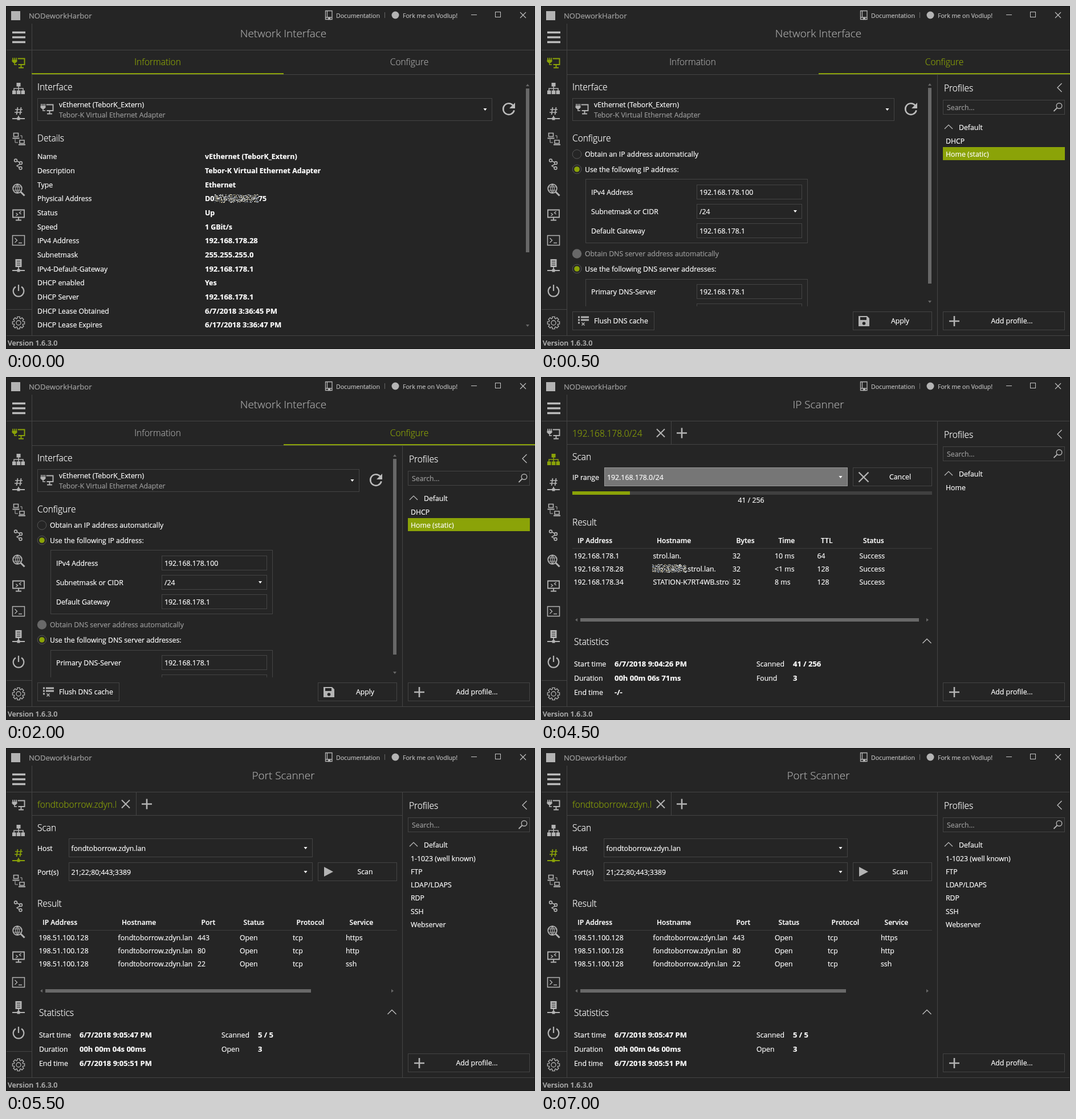
Animation of 928x603 px, one loop 8000 ms. Source, as an HTML page:

```html
<!DOCTYPE html>
<html lang="en">
<head>
<meta charset="utf-8">
<title>Network tools</title>
<style>
html, body { margin: 0; width: 100%; height: 100%; overflow: hidden; background: #252525; }
svg { display: block; width: 928px; height: 603px; }
text {
  font: 12.3px "Open Sans", "Noto Sans", sans-serif; white-space: pre;
  color: #fff; fill: currentColor; stroke: currentColor; stroke-width: .2px;
}
.b { font-weight: 700; font-size: 12.4px; }
.n { font-weight: 700; font-size: 13px; }
.s { font-weight: 600; font-size: 12.1px; }
.h { font-weight: 300; font-size: 15.5px; stroke-width: .25px; }
.t { font-weight: 300; font-size: 18.9px; color: #adadad; }
.tab { font-weight: 300; font-size: 15.5px; color: #a8a8a8; }
.on { color: #8ba308; }
.dim { color: #9b9b9b; }
.app { font-size: 13.1px; color: #a3a3a3; }
.cmd { font-size: 10.6px; color: #c0c0c0; }
.ver { font-weight: 600; font-size: 12.5px; color: #b4b4b4; }
.mid { text-anchor: middle; }
</style>
</head>
<body>
<svg id="stage" viewBox="0 0 928 603"></svg>
<script>
const LIME = '#8ba308', LINE = '#444', ICON = '#b4b4b4', BAR = '#686868', BG = '#252525';
const LOOP = 8000;
const HOST = 'fondtoborrow.zdyn.lan';
const ADAPTER = 'Tebor-K Virtual Ethernet Adapter', LINK = 'vEthernet (TeborK_Extern)';

// Drawing helpers
const text = (x, y, s, cls = '') =>
  `<text x="${x}" y="${y}" class="${cls}">${s.replace(/</g, '&lt;')}</text>`;
const fill = (x, y, w, h, c) => `<rect x="${x}" y="${y}" width="${w}" height="${h}" fill="${c}"/>`;
const box = (x1, y1, x2, y2, bg = 'none', c = LINE) =>
  `<rect x="${x1 + .5}" y="${y1 + .5}" width="${x2 - x1 - 1}" height="${y2 - y1 - 1}" fill="${bg}" stroke="${c}"/>`;
const hline = (x1, x2, y, c = LINE) => fill(x1, y, x2 - x1, 1, c);
const vline = (x, y1, y2, c = LINE) => fill(x, y1, 1, y2 - y1, c);
const stroke = (d, c = ICON, w = 2) => `<path d="${d}" fill="none" stroke="${c}" stroke-width="${w}"/>`;
const solid = (d, c = ICON) => `<path d="${d}" fill="${c}"/>`;
const ring = (x, y, r, c = ICON, w = 2) =>
  `<circle cx="${x}" cy="${y}" r="${r}" fill="none" stroke="${c}" stroke-width="${w}"/>`;
const dot = (x, y, r, c = ICON) => `<circle cx="${x}" cy="${y}" r="${r}" fill="${c}"/>`;
const at = (x, y, s) => `<g transform="translate(${x} ${y})">${s}</g>`;
const clip = (x, y, w, h, s) =>
  `<svg x="${x}" y="${y}" width="${w}" height="${h}" viewBox="${x} ${y} ${w} ${h}">${s}</svg>`;
const arrow = (x, y, turn = 0, c = '#fff') =>
  `<path d="M-3-2h6l-3 4z" fill="${c}" transform="translate(${x} ${y}) rotate(${turn})"/>`;
const cross = (x, y, r, w) => stroke(`M${x - r} ${y - r}l${2 * r} ${2 * r}m0 ${-2 * r}l${-2 * r} ${2 * r}`, ICON, w);
const plus = (x, y, r) => stroke(`M${x - r} ${y}h${2 * r}M${x} ${y - r}v${2 * r}`, ICON, 2.6);

function gear() {
  let d = '';
  for (let i = 0; i < 8; i++) {
    [[-.3, 8], [-.2, 10.8], [.2, 10.8], [.3, 8]].forEach(([o, r]) => {
      const a = i * Math.PI / 4 + o;
      d += `${d ? 'L' : 'M'}${(r * Math.cos(a)).toFixed(2)} ${(r * Math.sin(a)).toFixed(2)}`;
    });
  }
  return stroke(d + 'Z', ICON, 1.3) + ring(0, 0, 4, ICON, 1.3);
}

const icons = {
  nic: c => stroke('M-10-9v5M-7-9v5M-4-9v5M-7-1v4h4', c, 1.6) + solid('M-11.5-5.5h9v3l-2.5 2.5h-4l-2.5-2.5z', c) +
    stroke('M-1.5-7.5h12v10.5h-11M4.5 3v5M0 8.5h9', c, 1.9),
  tree: c => solid('M-3.5-10h7v6.5h-7zM-11 3.5h6.5v6.5h-6.5zM-3.2 3.5h6.5v6.5h-6.5zM4.5 3.5h6.5v6.5h-6.5z', c) +
    stroke('M0-4v8M-8 4v-4h16v4', c, 1.5),
  port: c => stroke('M-1.5-11l-2 13M4.5-11l-2 13M-6-7h13M-7-2h13', c, 1.7) +
    stroke('M0 4v4M-11 9h22', c, 1.8) + solid('M-2.5 6.5h5v5h-5z', c),
  hosts: c => stroke('M-8.5-10.5h8v6h-8zM2 2h8v5.5h-8z', c, 1.6) +
    stroke('M-10.5-1.5h12M0 9.7h12', c, 2) + stroke('M-6 0v6h5M3-6h3v5', c, 1),
  route: c => [[-5, -6.5], [4, -2], [3.5, 7]].map(([x, y]) => ring(x, y, 2.4, c, 1.6)).join('') +
    stroke('M-3-5.5L2-3M2.5 0L-3 3L1.5 6', c, 1.5),
  globe: c => ring(-2, -2, 7.8, c, 1.8) +
    stroke('M-9-5H5M-9 1H5M-2-10V6M-2-10q-7 8 0 16q7-8 0-16', c, 1.1) + stroke('M3.5 3.5l7 7', c, 3),
  remote: c => stroke('M-10-8.5h20v13h-20zM0 4.5v4M-5 9.5h10', c, 1.8) +
    stroke('M-4.5-3l3 2.5l-3 2.5M4.500-6l-3 2.5l3 2.5', c, 1.4),
  shell: c => stroke('M-10.5-8.5h21v17h-21z', c, 1.5) + stroke('M-6.5-4l4 4l-4 4M0 4.5h6', c, 1.4),
  server: c => solid('M-5.5-11h11v14h-11z', c) + stroke('M-3-7.5h6M-3-4h6M-3-.5h6', BG, 1) +
    stroke('M0 3v5M-11 9h22', c, 1.8) + solid('M-2.5 6.5h5v5h-5z', c),
  power: c => stroke('M-5-7.5A9.300 9.300 0 1 0 5-7.5M0-11V0', c, 2.2),
};
const side = Object.keys(icons);
const sideY = i => 100 + Math.round(i * 44.55);

const refresh = x => at(x, 181,
  stroke('M7.2-6.6A9.8 9.8 0 1 0 9.5 2.4', '#bcbcbc', 2.6) + solid('M11-11v10h-10z', '#bcbcbc'));

// Speckled cover over hidden text
function scrub(x, y, w, h, seed) {
  const tones = ['#e9e9e9', '#8f8f8f', '#141414', '#c9bd91', '#7d8ba0'];
  const paths = tones.map(() => '');
  const rnd = () => (seed = seed * 16807 % 2147483647) / 2147483647;
  for (let j = 0; j < h; j++) for (let i = 0; i < w; i++) {
    const edge = Math.abs(j + .5 - h / 2) / (h / 2) + .12 * Math.sin(i * .4);
    if (rnd() > (edge > .85 ? .2 : .68)) continue;
    paths[Math.floor(rnd() * tones.length)] += `M${x + i} ${y + j}h1v1h-1z`;
  }
  return paths.map((d, i) => solid(d, tones[i])).join('');
}

function shell() {
  let s = fill(0, 0, 928, 603, BG);
  s += hline(0, 928, 77) + hline(0, 928, 579) + hline(0, 45, 533) + vline(45, 31, 579);
  s += fill(9, 9, 16, 16, ICON) + text(40, 22, 'NODeworkHarbor', 'app');
  s += stroke('M560.5 8.5h11.5v15h-11.5zM563.5 8v12M560 20h12', ICON, 1.3) + solid('M565 20h4v5l-2-2l-2 2z');
  s += text(579, 20.5, 'Documentation', 'cmd') + vline(664, 11, 21, '#666');
  s += dot(683, 16, 6.5) + text(696, 20.5, 'Fork me on Vodlup!', 'cmd');
  s += hline(816, 826, 15, '#c4c4c4') + box(858, 10, 868, 20, 'none', '#c4c4c4');
  s += stroke('M902 11l10 10m0-10l-10 10', '#c4c4c4', 1.1);
  s += stroke('M11 46.5h23M11 55h23M11 63.5h23', '#bcbcbc', 3.6);
  side.forEach((k, i) => s += at(22, sideY(i), icons[k](ICON)));
  s += at(22, 557, gear());
  return s + text(3, 596.5, 'Version 1.6.3.0', 'ver') + box(0, 0, 928, 603, 'none', '#171717');
}

const active = i => fill(8, sideY(i) - 14, 29, 28, BG) + at(22, sideY(i), icons[side[i]](LIME));
const title = s => text(486.5, 54.5, s, 't mid');

function button(x1, y1, x2, y2, label, cx) {
  return box(x1, y1, x2, y2) + text(cx, (y1 + y2) / 2 + 4.8, label, 'mid');
}

function tabs(second) {
  return hline(45, 928, 120) + fill(second ? 487 : 45, 118, second ? 441 : 442, 2, LIME) +
    text(266, 104, 'Information', 'tab mid' + (second ? '' : ' on')) +
    text(707.5, 104, 'Configure', 'tab mid' + (second ? ' on' : ''));
}

function adapter(right, cx) {
  return text(55, 147.5, 'Interface', 'h') + box(55, 162, right, 202) + at(72, 181, icons.nic(ICON)) +
    text(93, 178, LINK) + text(93, 195.7, ADAPTER, 'dim') + arrow(right - 12.5, 182) + refresh(cx);
}

function vbar(x, y1, y2, end) {
  return fill(x - 3, y1, 6, y2 - y1, BAR) + arrow(x, y1 - 6, 180, BAR) + arrow(x, end, 0, BAR);
}

function profiles(dy, items, sel = -1) {
  let s = vline(695, 77 + dy, 579) + text(707, 107 + dy, 'Profiles', 'h');
  s += stroke(`M913.5 ${93 + dy}l-7.5 7.5l7.5 7.5`, '#c0c0c0', 1.3);
  s += box(705, 122 + dy, 919, 148 + dy) + text(712, 140 + dy, 'Search...', 'dim');
  s += ring(909, 132.5 + dy, 4.8, ICON, 1.4) + stroke(`M905.5 ${136 + dy}l-6 6`, ICON, 1.8);
  s += stroke(`M708 ${173 + dy}l7-7l7 7`, '#c0c0c0', 1.2) + text(733, 174.8 + dy, 'Default');
  items.forEach((t, i) => {
    if (i === sel) s += fill(705, 248, 214, 23, LIME);
    s += text(710, 198.8 + dy + i * 23.2, t);
  });
  return s + button(705, 537, 919, 570, 'Add profile...', 826) + plus(725, 554, 9);
}

function radio(y, label, state) {
  const off = state === 'off';
  return (off ? dot(63, y, 8.2, BAR) : ring(63, y, 7.8, '#565656', 1)) +
    (state === 'on' ? dot(63, y, 4.8, LIME) : '') + text(77, y + 4.8, label, off ? 'dim' : '');
}

const field = (y, label, value) =>
  text(88, y + 17.5, label) + box(273, y, 458, y + 26) + text(278, y + 17.5, value);

function scanTab(label) {
  return hline(45, 695, 118) + vline(228, 77, 118) +
    clip(55, 80, 139, 36, text(55, 104.5, label, 'tab on')) + cross(210, 98.5, 7, 2) + plus(247, 98.5, 9) +
    text(55, 145.5, 'Scan', 'h');
}

function table(y, cols, heads, rows) {
  let s = heads.map((t, i) => text(cols[i] + 6.5, y, t, 's')).join('') + hline(55, 686, y + 9, '#3d3d3d');
  rows.forEach((r, j) => r.forEach((t, i) => {
    s += clip(cols[i] - 3, y + 12 + j * 23.2, 137, 24, text(cols[i], y + 26.8 + j * 23.2, t));
  }));
  return s;
}

function stats(thumb, left, right) {
  let s = fill(69, 424, thumb - 69, 6, BAR) + arrow(62, 427, 90, BAR) + arrow(678, 427, -90, BAR);
  s += text(58, 471, 'Statistics', 'h') + stroke('M669.5 468l7.5-7.5l7.5 7.5', '#c0c0c0', 1.3);
  ['Start time', 'Duration', 'End time'].forEach((t, i) =>
    s += text(58, 509.4 + i * 25, t) + text(129, 509.4 + i * 25, left[i], 'n'));
  right.forEach(([k, v], i) => s += text(378, 509.4 + i * 25, k) + text(442, 509.4 + i * 25, v, 'n'));
  return s;
}

function infoScene() {
  let s = active(0) + title('Network Interface') + tabs(false) + adapter(853, 882) + text(55, 238.3, 'Details', 'h');
  [['Name', LINK], ['Description', ADAPTER], ['Type', 'Ethernet'], ['Physical Address', 'D0'], ['Status', 'Up'],
    ['Speed', '1 GBit/s'], ['IPv4 Address', '192.168.178.28'], ['Subnetmask', '255.255.255.0'],
    ['IPv4-Default-Gateway', '192.168.178.1'], ['DHCP enabled', 'Yes'], ['DHCP Server', '192.168.178.1'],
    ['DHCP Lease Obtained', '6/7/2018 3:36:45 PM'], ['DHCP Lease Expires', '6/17/2018 3:36:47 PM']
  ].forEach(([k, v], i) => {
    const y = 269.3 + i * 24.67;
    s += text(55, y, k) + text(349, y, v, /\.\d|:/.test(v) ? 'n' : 'b');
  });
  return s + scrub(366, 331, 77, 15, 77) + text(443, 343.3, '75', 'b') + vbar(915, 145, 433, 562);
}

function configScene() {
  let s = active(0) + title('Network Interface') + tabs(true) + adapter(620, 649) + text(55, 238.3, 'Configure', 'h');
  s += radio(260.5, 'Obtain an IP address automatically') + radio(287, 'Use the following IP address:', 'on');
  s += box(78, 304, 468, 417) + field(314, 'IPv4 Address', '192.168.178.100') +
    field(348, 'Subnetmask or CIDR', '/24') + arrow(446, 361) + field(382, 'Default Gateway', '192.168.178.1');
  s += radio(435.5, 'Obtain DNS server address automatically', 'off') +
    radio(462, 'Use the following DNS server addresses:', 'on');
  s += clip(50, 475, 430, 53, box(78, 480, 468, 560) + field(489, 'Primary DNS-Server', '192.168.178.1') +
    box(273, 523, 458, 549));
  s += vbar(682, 144, 488, 520);
  s += box(55, 537, 199, 570) + text(93, 558.2, 'Flush DNS cache');
  s += stroke('M65 547h3M65 552h3M65 557h3M70 547h14M70 552h14', ICON, 3) + cross(74, 559, 2.5, 1.5);
  s += button(547, 537, 686, 570, 'Apply', 630);
  s += solid('M557 545h15l4 4v14h-19z') + fill(560, 547, 11, 5, BG) + dot(566.5, 558, 2.8, BG);
  return s + profiles(43, ['DHCP', 'Home (static)'], 1);
}

function ipScene() {
  const range = '192.168.178.0/24';
  let s = active(1) + title('IP Scanner') + scanTab(range) + text(55, 180.9, 'IP range');
  s += box(111, 159, 538, 192, '#767676', '#989898') + text(116, 180.9, range) + arrow(525.5, 176);
  s += button(547, 159, 686, 192, 'Cancel', 630) + cross(566, 176, 8.5, 2.4);
  s += fill(55, 201, 631, 6, '#404040') + fill(55, 201, 101, 6, LIME) + text(368.5, 220.7, '41 / 256', 'mid');
  s += text(55, 260.5, 'Result', 'h');
  s += table(291.8, [57.5, 196.5, 336, 410, 484.5, 558.5],
    ['IP Address', 'Hostname', 'Bytes', 'Time', 'TTL', 'Status'],
    [['192.168.178.1', 'strol.lan.', '32', '10 ms', '64', 'Success'],
      ['192.168.178.28', '', '32', '<1 ms', '128', 'Success'],
      ['192.168.178.34', 'STATION-K7RT4WB.strol', '32', '8 ms', '128', 'Success']]);
  s += scrub(195, 329, 60, 15, 41) + text(254, 341.8, '.strol.lan.');
  s += stats(663, ['6/7/2018 9:04:26 PM', '00h 00m 06s 71ms', '-/-'], [['Scanned', '41 / 256'], ['Found', '3']]);
  return s + profiles(0, ['Home']);
}

function portScene() {
  const ip = '198.51.100.128';
  let s = active(2) + title('Port Scanner') + scanTab(HOST);
  [['Host', HOST], ['Port(s)', '21;22;80;443;3389']].forEach(([k, v], i) => {
    const y = 159 + i * 42;
    s += text(55, y + 21.9, k) + box(110, y, 538, y + 33) + text(114.5, y + 21.9, v) + arrow(525.5, y + 17);
  });
  s += button(547, 201, 686, 234, 'Scan', 630) + solid('M558 209l16 8.5l-16 8.5z');
  s += text(55, 278.8, 'Result', 'h');
  s += table(311, [57.5, 196.5, 336, 410, 503, 596],
    ['IP Address', 'Hostname', 'Port', 'Status', 'Protocol', 'Service'],
    [['443', 'https'], ['80', 'http'], ['22', 'ssh']].map(([p, v]) => [ip, HOST, p, 'Open', 'tcp', v]));
  s += stats(535, ['6/7/2018 9:05:47 PM', '00h 00m 04s 00ms', '6/7/2018 9:05:51 PM'],
    [['Scanned', '5 / 5'], ['Open', '3']]);
  return s + profiles(0, ['1-1023 (well known)', 'FTP', 'LDAP/LDAPS', 'RDP', 'SSH', 'Webserver']);
}

// Each scene is shown from its start until the next one cuts in
const scenes = [[0, infoScene], [500, configScene], [3000, ipScene], [5500, portScene]];
const stage = document.getElementById('stage');
stage.innerHTML = shell() + scenes.map(([, draw]) => `<g class="scene">${draw()}</g>`).join('');
const layers = stage.querySelectorAll('.scene');

function tick() {
  const t = performance.now() % LOOP;
  const now = scenes.filter(([start]) => start <= t).length - 1;
  layers.forEach((g, i) => g.style.display = i === now ? '' : 'none');
  requestAnimationFrame(tick);
}
tick();
</script>
</body>
</html>
```
